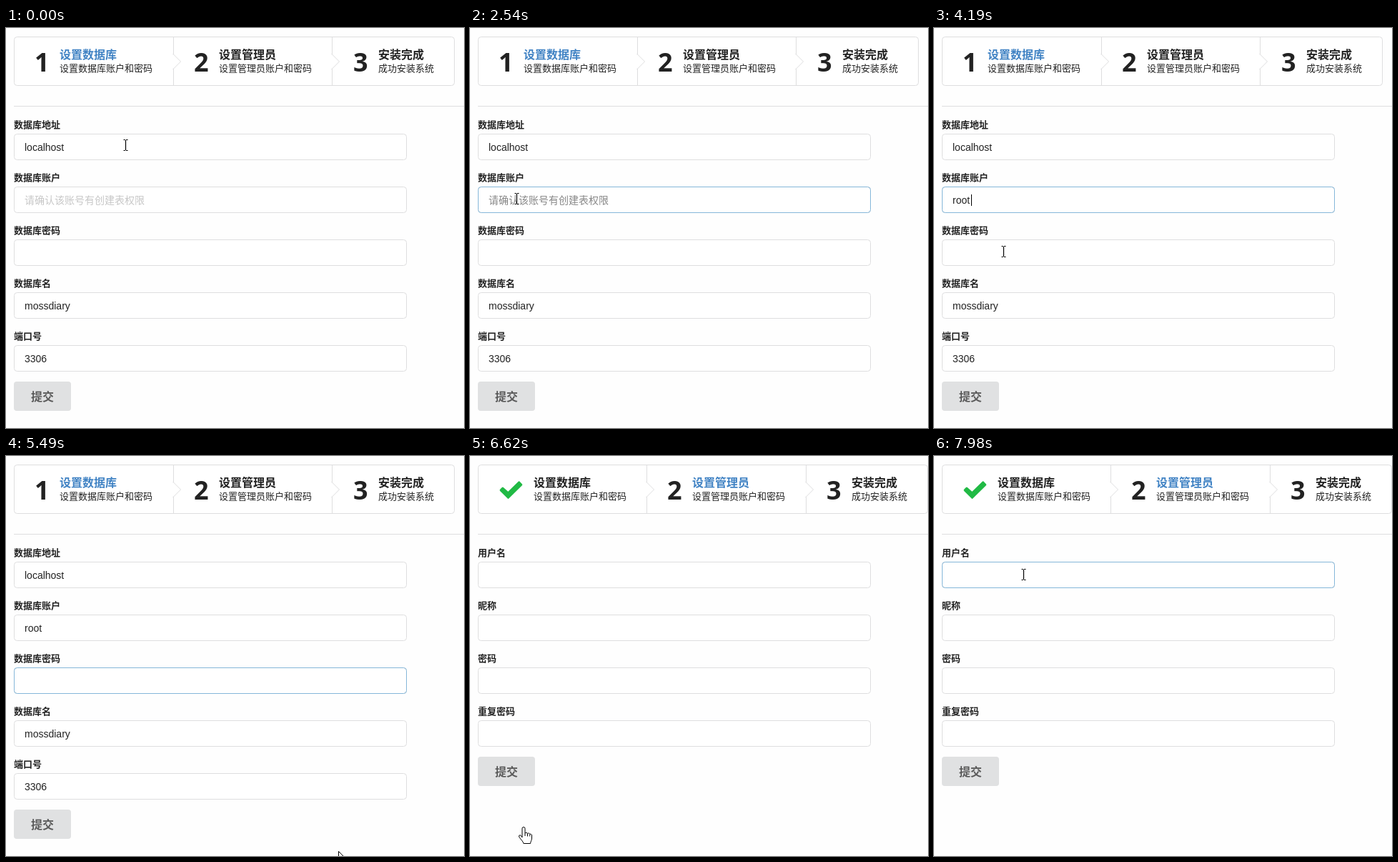
Write an HTML page that moves like this. It is 641 by 560 pixels and loops after 8 s.

```html
<!DOCTYPE html>
<html lang="zh-CN">
<head>
<meta charset="utf-8">
<title>安装向导</title>
<style>
html, body { margin: 0; width: 100%; height: 100%; overflow: hidden; background: #fefefe; }
svg { display: block; }
text { font-family: "Noto Sans CJK SC", "Noto Sans CJK", "Noto Sans", sans-serif; fill: #222; white-space: pre; }
.num { font: 700 36px "Open Sans", "Noto Sans", sans-serif; }
.title { font-size: 16px; font-weight: 700; }
.active { fill: #4183c4; }
.desc { font-size: 13px; }
.label { font-size: 13px; font-weight: 700; }
.value { font: 14px "Liberation Sans", Arial, sans-serif; }
.hint { font-size: 14px; fill: #c7c7c7; }
.submit { font-size: 16px; font-weight: 700; fill: #5a5a5a; }
.spell { font: 700 16px "Liberation Sans", Arial, sans-serif; fill: #000; }
.pick { font-family: "Noto Sans Mono CJK SC", "Noto Sans CJK SC", monospace; font-size: 16px; }
.first { fill: #0a74bf; }
.line { fill: #fff; stroke: #dededf; }
.glow { fill: none; stroke: #85b7d9; }
</style>
</head>
<body>
<svg id="stage" width="641" height="560" viewBox="0 0 641 560"></svg>
<script>
const LOOP = 8000;
const NS = 'http://www.w3.org/2000/svg';
const stage = document.getElementById('stage');

function add(parent, tag, attrs = {}, content = '') {
  const el = document.createElementNS(NS, tag);
  for (const key in attrs) el.setAttribute(key, attrs[key]);
  el.textContent = content;
  parent.appendChild(el);
  return el;
}
const group = parent => add(parent, 'g');
const write = (parent, cls, x, y, content) => add(parent, 'text', { class: cls, x, y }, content);
const box = (parent, cls, x, y, width, height, rx = 4) =>
  add(parent, 'rect', { class: cls, x: x + .5, y: y + .5, width: width - 1, height: height - 1, rx });
const fill = (parent, color, x, y, width, height, rx = 0) =>
  add(parent, 'rect', { fill: color, x, y, width, height, rx });
const show = (el, on) => { el.style.display = on ? '' : 'none'; };
const fieldTop = i => 148 + 74 * i;

const STEPS = [
  ['设置数据库', '设置数据库账户和密码'],
  ['设置管理员', '设置管理员账户和密码'],
  ['安装完成', '成功安装系统']
];

function drawSteps(page, active, dividers, right, starts) {
  box(page, 'line', 11, 12, right - 11, 69);
  for (const x of dividers) {
    add(page, 'path', { d: `M${x + .5} 13V80`, class: 'line' });
    add(page, 'path', { d: `M${x - .5} 36L${x + 10.5} 47L${x - .5} 58`, class: 'line' });
  }
  STEPS.forEach(([title, desc], i) => {
    const x = starts[i];
    if (i < active) {
      add(page, 'path', {
        d: 'M71.8 40.3L53.5 58.3L43.1 47.9L45.8 45.1L53.4 51.9L68.7 36.9Z',
        fill: '#21ba45', stroke: '#21ba45', 'stroke-width': 3, 'stroke-linejoin': 'round'
      });
    } else {
      write(page, 'num', x - 35, 61, i + 1);
    }
    write(page, i === active ? 'title active' : 'title', x, 43, title);
    write(page, 'desc', x, 61, desc);
  });
  fill(page, '#dededf', 11, 109, 630, 1);
}

function drawForm(page, labels) {
  const glows = labels.map((label, i) => {
    const y = fieldTop(i);
    write(page, 'label', 11, y - 8, label);
    box(page, 'line', 11, y, 550, 37);
    return box(page, 'glow', 11, y, 550, 37);
  });
  const y = fieldTop(labels.length) + 51 - 148 + 148 - 51;
  const button = fill(page, '#e0e1e2', 11, y - 23 + 0, 80, 41, 4);
  button.setAttribute('y', y - 23);
  write(page, 'submit', 35, y + 4, '提交');
  return { page, glows, button };
}

function drawPage(active, dividers, right, starts, labels) {
  const page = group(stage);
  drawSteps(page, active, dividers, right, starts);
  return drawForm(page, labels);
}

const pages = [
  drawPage(0, [234, 456], 628, [75, 298, 521],
    ['数据库地址', '数据库账户', '数据库密码', '数据库名', '端口号']),
  drawPage(1, [247, 470], 641, [89, 311, 534],
    ['用户名', '昵称', '密码', '重复密码'])
];

// Contents of the first form
const form = pages[0].page;
const marked = fill(form, '#bfbfbf', 44, 159, 38, 16);
write(form, 'value', 26, 172, 'localhost');
const hint = write(form, 'hint', 26, 246, '请确认该账号有创建表权限');
const account = write(form, 'value', 26, 246, '');
const underline = fill(form, '#222', 26, 248, 0, 1);
write(form, 'value', 26, 394, 'mossdiary');
write(form, 'value', 26, 468, '3306');
const caret = fill(stage, '#000', 26, 0, 1, 16);

// Input method window
const ime = group(stage);
box(ime, 'line', 52, 237, 289, 56, 0);
fill(ime, '#e4e4e4', 53, 262, 287, 1);
const spell = write(ime, 'spell', 62, 257, '');
const spellCaret = fill(ime, '#000', 91, 242, 1, 17);
add(ime, 'path', {
  d: 'M327 250.5a4 4 0 1 1-8 0a4 4 0 1 1 8 0M326 254L330 258.5',
  fill: 'none', stroke: '#0a74bf', 'stroke-width': 2.4
});
const picks = [62, 122, 172, 217, 261].map((x, i) =>
  write(ime, i ? 'pick' : 'pick first', x, 284, ''));
const cloud = add(ime, 'path', {
  d: 'M144 284.5a4 4 0 0 1-.6-7.6a5.5 5.5 0 0 1 10.4-1.2a4.5 4.5 0 0 1 1.2 8.8Z',
  fill: 'none', stroke: '#444', 'stroke-width': 1.8
});
add(ime, 'path', { d: 'M309 273v11l-5-5.5Z', fill: '#aaa' });
add(ime, 'path', { d: 'M319 273v11l5-5.5Z', fill: '#444' });
fill(ime, '#e2e2e2', 346, 237, 20, 20);

const pointer = group(stage);
const shapes = {
  beam: 'M-3 -7.5H-.5M.5 -7.5H3M0 -7V7M-3 7.5H-.5M.5 7.5H3',
  arrow: 'M.5 .5V16.5L4.2 13L6.8 18.8L9.3 17.7L6.7 12H11.8Z',
  hand: 'M-2 15V2.5a2 2 0 0 1 4 0V9a2 1.8 0 0 1 3.5 .5a2 1.8 0 0 1 3.3 1a1.8 1.8 0 0 1 2.7 1.5V16' +
    'c0 3-1.5 4-2 7.5H0c-.6-3-4-5.5-6.2-9.2c-1-2 1-3.2 2.4-2ZM2 9v4M5.5 9.5v4M8.8 10.5v3'
};
const cursors = {};
for (const kind in shapes) {
  cursors[kind] = add(pointer, 'path', {
    d: shapes[kind], stroke: '#000', 'stroke-width': kind === 'beam' ? 1.2 : 1,
    fill: kind === 'beam' ? 'none' : '#fff'
  });
}

// Each entry: time, pointer [kind, x, y] or null to keep it, other changes
const START = { page: 0, glow: {}, caret: null, mark: null, text: '', typing: null, button: '#e0e1e2' };
const WORDS = {
  "r": ['1.人', '2.让', '3.如', '4.日', '5.入'],
  "ro": ['1.肉', '2.揉', '3.柔', '4.荣', '5.容'],
  "ro'o": ['1.肉哦', '2.', '3.肉', '4.荣', '5.容'],
  "ro'o't": ['1.肉哦他', '', '3.肉', '4.荣', '5.容']
};
const TIMELINE = [
  [0, ['beam', 167, 164], {}],
  [710, null, { glow: { 0: .5 }, caret: [0, 82] }],
  [830, null, { glow: { 0: 1 } }],
  [1260, ['beam', 21, 171], { mark: 44, caret: null }],
  [1410, null, { mark: 26 }],
  [1690, ['beam', 42, 200], {}],
  [1830, ['beam', 65, 239], {}],
  [1960, null, { glow: { 0: .5, 1: .5 }, mark: null, caret: [1, 26] }],
  [2110, null, { glow: { 1: 1 } }],
  [2540, null, { caret: null }],
  [2970, ['arrow', 64, 238], { text: 'r', typing: "r" }],
  [3100, null, { text: 'ro', typing: "ro" }],
  [3210, null, { text: 'roo', typing: "ro'o" }],
  [3360, null, { text: 'root', typing: "ro'o't" }],
  [3790, ['beam', 65, 239], { typing: null, caret: [1, 52] }],
  [3950, ['beam', 78, 266], {}],
  [4120, ['beam', 97, 313], {}],
  [4280, null, { glow: { 1: .6, 2: .4 }, caret: null }],
  [4450, null, { glow: { 1: .2, 2: .8 }, caret: [2, 26] }],
  [4610, null, { glow: { 2: 1 } }],
  [5040, null, { caret: null }],
  [5190, ['beam', 185, 386], {}],
  [5340, ['beam', 282, 458], {}],
  [5490, ['arrow', 465, 553], {}],
  [5640, ['arrow', 390, 550], { caret: [2, 26] }],
  [5760, ['arrow', 245, 540], {}],
  [5880, ['arrow', 128, 527], {}],
  [6030, ['hand', 75, 515], { button: '#cacbcd' }],
  [6170, ['hand', 75, 519], { glow: { 2: .5 }, caret: null, button: '#babbbc' }],
  [6310, null, { glow: {}, button: '#cacbcd' }],
  [6620, null, { page: 1, text: '', button: '#e0e1e2' }],
  [6740, ['arrow', 82, 500], {}],
  [6880, ['arrow', 97, 430], {}],
  [7000, ['arrow', 108, 345], {}],
  [7150, ['beam', 118, 245], {}],
  [7300, ['beam', 125, 166], {}],
  [7430, null, { glow: { 0: .5 }, caret: [0, 26] }],
  [7580, null, { glow: { 0: 1 } }],
  [7980, null, { caret: null }]
];

function stateAt(time) {
  let state = { ...START };
  for (const [at, move, change] of TIMELINE) {
    if (at > time) break;
    state = { ...state, ...change, move: move || state.move, at };
  }
  return state;
}

function render(s) {
  pages.forEach(({ page, glows, button }, i) => {
    show(page, i === s.page);
    glows.forEach((glow, n) => glow.setAttribute('opacity', i === s.page && s.glow[n] || 0));
    button.setAttribute('fill', s.button);
  });

  show(marked, s.mark !== null);
  if (s.mark !== null) {
    marked.setAttribute('x', s.mark);
    marked.setAttribute('width', 82 - s.mark);
  }

  show(hint, !s.text);
  hint.style.fill = s.glow[1] ? '#878787' : '#c7c7c7';
  account.textContent = s.text;

  show(ime, s.typing);
  show(underline, s.typing);
  let mark = s.caret;
  if (s.typing) {
    const width = account.getComputedTextLength();
    underline.setAttribute('width', width);
    mark = [1, Math.round(27 + width)];
    spell.textContent = s.typing;
    spellCaret.setAttribute('x', Math.round(62 + spell.getComputedTextLength()));
    picks.forEach((pick, i) => { pick.textContent = WORDS[s.typing][i]; });
    show(cloud, WORDS[s.typing][1] === '2.');
  }
  show(caret, mark);
  if (mark) {
    caret.setAttribute('x', mark[1]);
    caret.setAttribute('y', fieldTop(mark[0]) + 11);
  }

  const [kind, x, y] = s.move;
  for (const name in cursors) show(cursors[name], name === kind);
  const shift = kind === 'beam' ? .5 : 0;
  pointer.setAttribute('transform', `translate(${x + shift} ${y})`);
}

const begin = performance.now();
let last = -1;
function tick() {
  const state = stateAt((performance.now() - begin) % LOOP);
  if (state.at !== last) render(state);
  last = state.at;
  requestAnimationFrame(tick);
}
tick();
</script>
</body>
</html>
```
